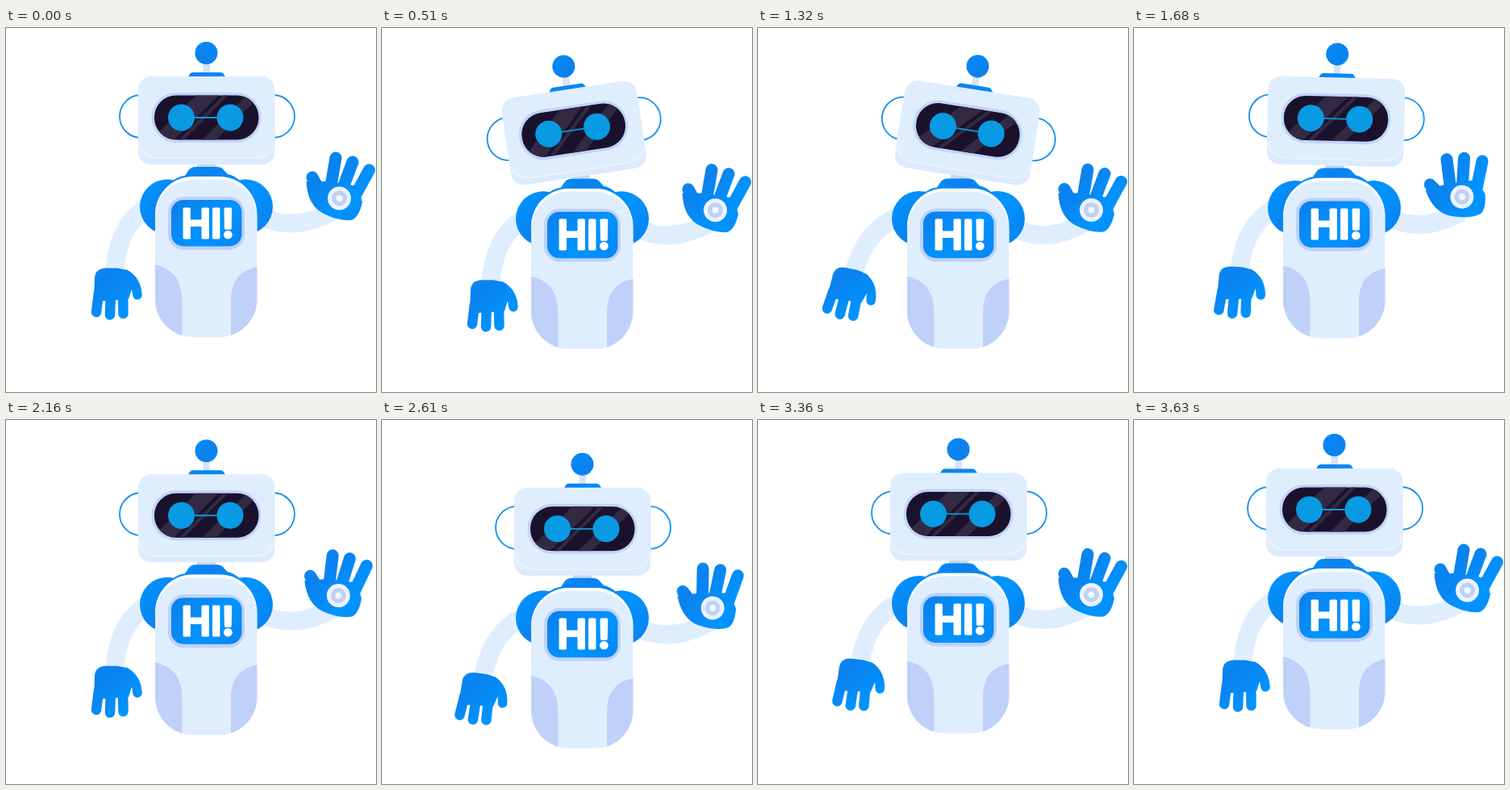
Animation of 459x451 px, one loop 3660 ms. Source, as an HTML page:

```html
<!DOCTYPE html>
<html lang="en">
<head>
<meta charset="utf-8">
<title>Waving robot</title>
<style>
html, body { margin: 0; width: 100%; height: 100%; overflow: hidden; background: #fff; }
svg { display: block; width: 459px; height: 451px; }
.blue { fill: url(#blue); }
.skin { fill: #dfeeff; }
.arm { fill: none; stroke: #dfeeff; stroke-width: 23; }
.digits { fill: none; stroke: url(#blue); stroke-linecap: round; }
.tint { fill: #bfd1f8; }
.ear { fill: none; stroke: #1590ec; stroke-width: 1.8; }
.label { font: 600 49px Inter, Arial, sans-serif; fill: #fff; stroke: #fff; stroke-width: 3; stroke-linejoin: round; }
</style>
</head>
<body>
<svg viewBox="0 0 459 451">
  <defs>
    <linearGradient id="blue" gradientUnits="userSpaceOnUse" x1="0" y1="0" x2="36" y2="36" spreadMethod="reflect">
      <stop stop-color="#0a82ee"/><stop offset="1" stop-color="#0094ff"/>
    </linearGradient>
    <clipPath id="visor"><rect x="184" y="83.500" width="129.500" height="55" rx="27"/></clipPath>
    <clipPath id="torso"><rect x="185" y="184" width="126.500" height="199" rx="47"/></clipPath>
  </defs>
  <g id="robot">
    <g id="leftArm">
      <path class="arm" d="M182 218Q138 241 135 303"/>
      <path class="blue" d="M110 309Q111 298 124 297.500H138Q154 299 160 311L152 336 109 339Z"/>
      <path class="digits" stroke-width="12.500" d="M115 328 112 352M130 328 129 355.500M145 328 145.500 354"/>
      <path class="digits" stroke-width="11.500" d="M148 305Q162 313 163 331"/>
    </g>
    <path class="arm" d="M318 234Q358 253 406 227"/>
    <g id="rightHand">
      <path class="blue" d="M372.500 190Q374 220 394 230 414 240 429 238 438 234 442 216L437 196 398 190Z"/>
      <path class="digits" stroke-width="15" d="M380 185 391 205M403 196 409 161M418 198 430 166M433 208 450.500 176"/>
      <circle cx="413.500" cy="211" r="14.500" fill="#edf3fe"/>
      <circle cx="413.500" cy="211" r="9.500" class="tint"/>
      <circle cx="413.500" cy="211" r="4" fill="#f4f8ff"/>
    </g>

    <g id="head">
      <rect x="237" y="160" width="23" height="24" fill="#c8d6f3"/>
      <circle class="ear" cx="167.500" cy="109.500" r="26.500"/>
      <circle class="ear" cx="331.500" cy="109.500" r="26.500"/>
      <rect x="244.500" y="43" width="8.500" height="14" fill="#d5e3fb"/>
      <circle class="blue" cx="248.500" cy="31" r="14"/>
      <path class="blue" d="M225 62 228 57Q229 55 232 55H266Q269 55 270 57L273 62Z"/>
      <rect x="164" y="66" width="169.500" height="103" rx="16" fill="#dceafe"/>
      <rect class="skin" x="164" y="60" width="169.500" height="102" rx="16"/>
      <path d="M164 142Q170 161 192 161.500H306Q328 161 333.500 142" fill="none" stroke="#eef6ff" stroke-width="1.200"/>
      <rect x="180.500" y="80" width="136" height="62" rx="30.500" fill="#c4d3fa"/>
      <g clip-path="url(#visor)">
        <rect x="184" y="83" width="130" height="56" fill="#1a122c"/>
        <path d="M236 83H264L208 139H180ZM270 83H276L220 139H214ZM299 83H316L260 139H243Z" fill="#312a42"/>
      </g>
      <path d="M217 111H278" stroke="#1296dd" stroke-width="1.800"/>
      <circle cx="217.500" cy="111" r="16.500" fill="#089ae3"/>
      <circle cx="278" cy="111" r="16.500" fill="#089ae3"/>
    </g>

    <circle class="blue" cx="200" cy="221.500" r="34"/>
    <circle class="blue" cx="297" cy="221.500" r="34"/>
    <path class="blue" d="M206 190Q213 184 222 183L226 177Q229 172 236 172H261Q268 172 271 177L275 181Q284 183 291 190V205H206Z"/>
    <g clip-path="url(#torso)">
      <rect x="185" y="184" width="127" height="199" fill="#fff"/>
      <rect class="skin" x="185" y="188" width="126.500" height="210" rx="47"/>
      <path class="tint" d="M185 293Q218 300 218.500 337V384H185ZM312 296Q279 302 279 337V384H312Z"/>
    </g>
    <rect class="tint" x="201" y="209" width="95" height="66" rx="20"/>
    <rect class="blue" x="205" y="213" width="87.500" height="57.500" rx="15"/>
    <text class="label" x="217.500" y="259.500">HI!</text>
  </g>
</svg>
<script>
const LOOP = 3660;
const part = id => document.getElementById(id);
const [robot, head, leftArm, rightHand] = ['robot', 'head', 'leftArm', 'rightHand'].map(part);

// Each track is a list of [ms, value] keys.
const bob = [[0, 0], [510, 14.8], [925, 25.7], [1080, 23.2], [1620, 3], [1680, 1.4], [1815, 0],
  [2160, 7.2], [2610, 23.8], [2750, 25.7], [3090, 15.8], [3240, 9.4], [3610, 0], [LOOP, 0]];
const swing = [[0, 0], [495, 0], [540, 0.7], [900, 18.3], [980, 18.5], [1080, 17.6], [1620, 5], [1680, 3],
  [1810, 0], [2450, 0], [2610, 7], [2700, 14.5], [2810, 18.5], [3090, 15], [3240, 10.5], [3600, 0], [LOOP, 0]];
const tilt = [[0, 0], [450, -9.1], [905, 0], [920, 0], [1350, 9.1], [1790, 0], [LOOP, 0]];
const wave = [[0, 0], [1320, 0], [1690, -17], [2060, 0], [2430, -17], [2800, 0], [LOOP, 0]];

// Smooth curve through the keys, flat at every turning point.
function sample(keys, t) {
  const i = Math.max(1, keys.findIndex(k => k[0] >= t));
  const slope = j => {
    const a = keys[j - 1], b = keys[j], c = keys[j + 1];
    if (!a || !c || (b[1] - a[1]) * (c[1] - b[1]) <= 0) return 0;
    return (c[1] - a[1]) / (c[0] - a[0]);
  };
  const [t0, v0] = keys[i - 1], [t1, v1] = keys[i], span = t1 - t0;
  const u = (t - t0) / span, w = 1 - u;
  return v0 * w * w * (1 + 2 * u) + v1 * u * u * (3 - 2 * u)
    + span * u * w * (slope(i - 1) * w - slope(i) * u);
}

const turn = (el, angle, x, y) => el.setAttribute('transform', `rotate(${angle} ${x} ${y})`);

function draw(now) {
  const t = now % LOOP;
  robot.setAttribute('transform', `translate(0 ${sample(bob, t)})`);
  turn(head, sample(tilt, t), 248.5, 185);
  turn(leftArm, sample(swing, t), 187, 220);
  turn(rightHand, sample(wave, t), 399.5, 231.5);
  requestAnimationFrame(() => draw(performance.now() - start));
}
const start = performance.now();
draw(0);
</script>
</body>
</html>
```
